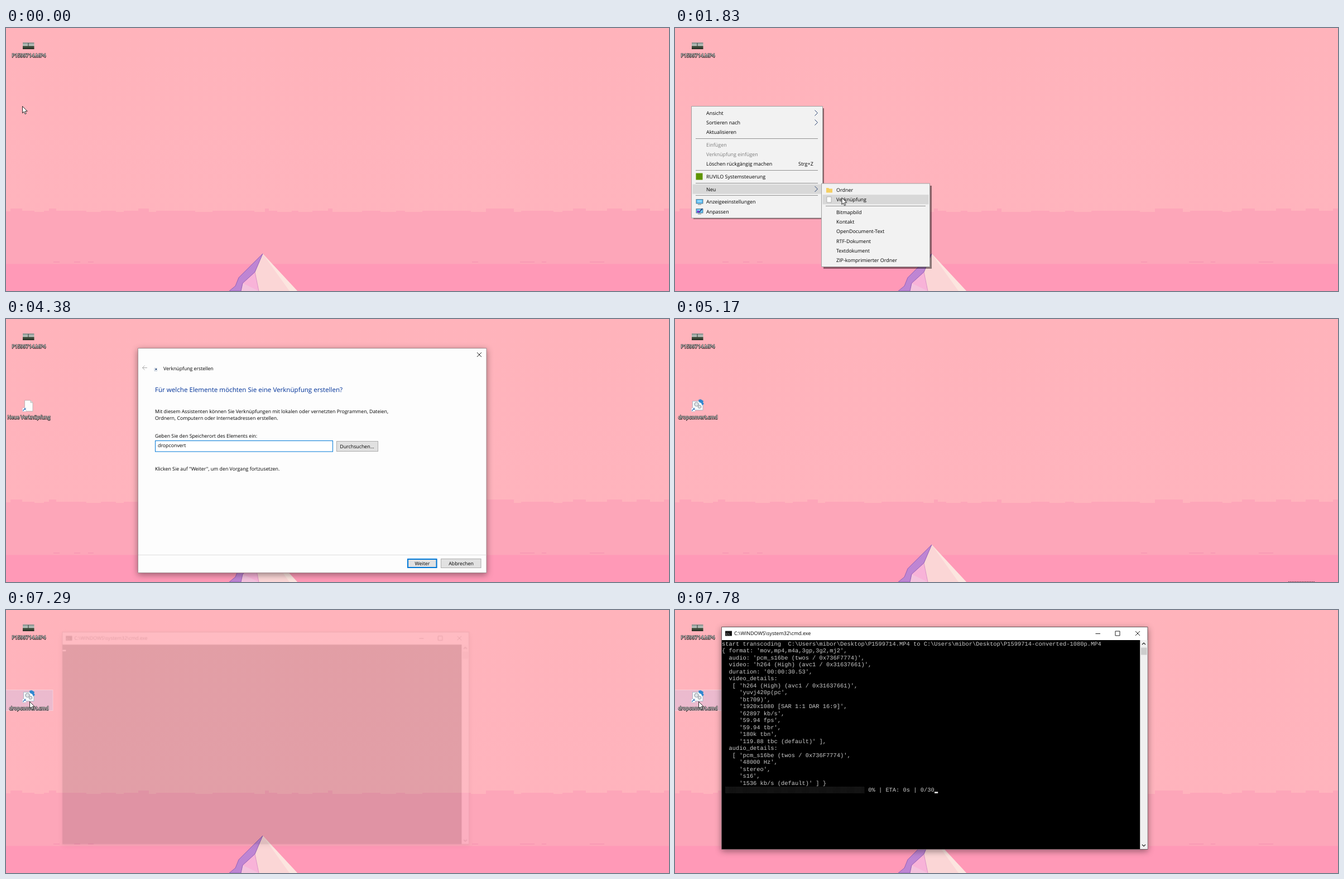
An HTML page that plays this animation: 1188 px wide and 472 px high, repeating every 8000 ms.

```html
<!DOCTYPE html>
<html lang="de">
<head>
<meta charset="utf-8">
<title>Verknüpfung erstellen</title>
<style>
html, body { margin: 0; height: 100%; overflow: hidden; background: #ffb3bb; }
svg { display: block; width: 100vw; height: 100vh; }
text { font: 8.8px "Open Sans", "Noto Sans", sans-serif; text-rendering: geometricPrecision; white-space: pre; }
.menu text { font-size: 8.95px; }
.off { fill: #7d7d7d; }
.sep { stroke: #919191; }
.chev { fill: none; stroke: #27406f; }
.label { fill: #fff; text-anchor: middle; paint-order: stroke; stroke: #222; stroke-opacity: .75; stroke-width: 1.3px; filter: drop-shadow(.5px 1px .6px #0009); }
.tint { fill: #b4cdff; fill-opacity: .27; stroke: #fff; stroke-opacity: .3; }
.head { font-size: 11.6px; fill: #039; }
.btn { fill: #e1e1e1; stroke: #adadad; }
.focus { fill: #e1e1e1; stroke: #0078d7; stroke-width: 2; }
.field { fill: #fff; stroke: #0078d7; }
.mid { text-anchor: middle; }
.glyph { fill: none; stroke: #222; }
.console text { font: 10.405px "Liberation Mono", "DejaVu Sans Mono", monospace; fill: #ccc; }

/* 1% = 80 ms */
.a { animation: 8s step-end infinite; }
.move { animation-timing-function: linear; }
.cursor { animation-name: cursor; }
.menu1 { animation-name: menu1; }
.menu2 { animation-name: menu2; }
.hover1 { animation-name: hover1; }
.hover2 { animation-name: hover2; }
.newicon { animation-name: newicon; }
.cmdicon { animation-name: cmdicon; }
.dialog { animation-name: dialog; transform-origin: 548.5px 254px; }
.page1 { animation-name: page1; }
.page2 { animation-name: page2; }
.ready { animation-name: ready; }
.typing { animation-name: typing; }
.caret { animation-name: caret; }
.filehover { animation-name: filehover; }
.cmdhover { animation-name: cmdhover; }
.ghost { animation-name: ghost; }
.edge { animation-name: edge; }
.shell { animation-name: shell; transform-origin: 465px 229.5px; }
.first { animation-name: first; }
.rest { animation-name: rest; }
.block { animation-name: block; }

@keyframes cursor {
  0%, 5% { transform: translate(29px, 140px); opacity: 1; }
  10%, 10.6% { transform: translate(124px, 285px); }
  11.875%, 12.8% { transform: translate(121px, 284px); }
  14.75%, 17.5% { transform: translate(234px, 284px); }
  19% { transform: translate(268px, 288px); }
  20.6% { transform: translate(290px, 299.5px); }
  23.875%, 26.12% { transform: translate(302px, 306px); opacity: 1; }
  26.125% { transform: translate(302px, 306px); opacity: 0; }
  71.99% { transform: translate(198px, 3px); opacity: 0; }
  72% { transform: translate(198px, 3px); opacity: 1; }
  75% { transform: translate(88px, 24px); }
  77.75%, 80% { transform: translate(40px, 34px); }
  87%, 100% { transform: translate(42px, 164px); opacity: 1; }
}
@keyframes menu1 {
  0%, 2.3% { opacity: 0; }
  3.9%, 26.12% { opacity: 1; }
  26.125%, 100% { opacity: 0; }
}
@keyframes menu2 {
  0%, 12.8% { opacity: 0; }
  14.75%, 26.12% { opacity: 1; }
  26.125%, 100% { opacity: 0; }
}
@keyframes hover1 {
  0% { opacity: 0; transform: none; }
  5.15% { opacity: 1; transform: none; }
  5.75% { opacity: 1; transform: translateY(17.2px); }
  6.3% { opacity: 1; transform: translateY(34.4px); }
  7.1% { opacity: 1; transform: translateY(57.2px); }
  7.7% { opacity: 1; transform: translateY(74.4px); }
  8.3% { opacity: 1; transform: translateY(91.6px); }
  9.05% { opacity: 1; transform: translateY(114.4px); }
  9.8%, 100% { opacity: 1; transform: translateY(137.2px); }
}
@keyframes hover2 {
  0% { opacity: 0; transform: none; }
  18.75% { opacity: 1; transform: none; }
  20.6%, 100% { opacity: 1; transform: translateY(17.2px); }
}
@keyframes newicon { 0% { opacity: 0; } 26.125% { opacity: 1; } 63.75%, 100% { opacity: 0; } }
@keyframes cmdicon { 0% { opacity: 0; } 63.75%, 100% { opacity: 1; } }
@keyframes dialog {
  0%, 26.8% { opacity: 0; transform: scale(.95); }
  28% { opacity: .6; transform: scale(.985); }
  29.5%, 61% { opacity: 1; transform: none; }
  63.125%, 100% { opacity: 0; transform: scale(.93); }
}
@keyframes page1 { 0% { opacity: 1; } 58.25%, 100% { opacity: 0; } }
@keyframes page2 { 0% { opacity: 0; } 58.25%, 100% { opacity: 1; } }
@keyframes ready { 0% { opacity: 0; } 33.75%, 100% { opacity: 1; } }
@keyframes typing {
  0% { transform: none; }
  33.75% { transform: translateX(5.4px); }
  34.375% { transform: translateX(9px); }
  35% { transform: translateX(14.3px); }
  37.25% { transform: translateX(19.7px); }
  41.375% { transform: translateX(29.2px); }
  43.625% { transform: translateX(34.6px); }
  46.75% { transform: translateX(39px); }
  47.5% { transform: translateX(44px); }
  48.375%, 100% { transform: translateX(50.8px); }
}
@keyframes caret { 0% { opacity: 1; } 31.5% { opacity: 0; } 33.75% { opacity: 1; } 54.75%, 100% { opacity: 0; } }
@keyframes filehover { 0% { opacity: 0; } 75.2% { opacity: 1; } 89.25%, 100% { opacity: 0; } }
@keyframes cmdhover { 0% { opacity: 0; } 85.9%, 100% { opacity: 1; } }
@keyframes ghost {
  0%, 79.99% { opacity: 0; transform: none; }
  80% { opacity: .55; transform: none; }
  87%, 89.24% { opacity: .55; transform: translate(2px, 130px); }
  89.25%, 100% { opacity: 0; transform: translate(2px, 130px); }
}
@keyframes edge { 0% { opacity: 0; } 64.625% { opacity: 1; } 89.25%, 100% { opacity: 0; } }
@keyframes shell {
  0%, 90.8% { opacity: 0; transform: scale(.95); }
  91.125% { opacity: .11; transform: scale(.954); }
  92.2% { opacity: .65; transform: scale(.985); }
  93.6%, 100% { opacity: 1; transform: none; }
}
@keyframes first { 0% { opacity: 0; } 94.375%, 100% { opacity: 1; } }
@keyframes rest { 0% { opacity: 0; } 97.25%, 100% { opacity: 1; } }
@keyframes block {
  0% { transform: none; }
  94.375% { transform: translateY(12.5px); }
  97.25%, 100% { transform: translate(381px, 262.3px); }
}
</style>
</head>
<body>
<svg viewBox="0 0 1188 472" preserveAspectRatio="none">
  <defs>
    <linearGradient id="sky" x2="0" y2="1">
      <stop stop-color="#ffb3bb"/><stop offset="1" stop-color="#ffb4be"/>
    </linearGradient>
    <linearGradient id="photo" x2="0" y2="1">
      <stop stop-color="#7f8a86"/><stop offset=".45" stop-color="#c3cac6"/>
      <stop offset=".55" stop-color="#4c5a48"/><stop offset="1" stop-color="#23291f"/>
    </linearGradient>
    <g id="file">
      <rect x="30" y="26" width="20.500" height="12" fill="url(#photo)"/>
      <path d="M40 27v6" stroke="#333"/>
      <text class="label" x="41" y="52">P1599714.MP4</text>
    </g>
    <g id="link">
      <path d="M29.500 159.500h6.500v6.500h-6.500z" fill="#fff" stroke="#a9b8c8" stroke-width=".5"/>
      <path d="M31 165c0-2 1-3 3-3m-1.500-1.200h2v2.200" fill="none" stroke="#1c62b5" stroke-width="1.100"/>
    </g>
    <g id="screen">
      <rect x="38" y="307.500" width="12" height="7.500" fill="#4fb6f0" stroke="#5b6d7c" stroke-width=".8"/>
      <path d="M40 309h8v4h-8z" fill="#8ed5fa"/>
      <path d="M41 316.800h6" stroke="#6c7984"/>
    </g>
    <path id="chev" class="chev" d="M0 0l5 5-5 5"/>
    <path id="x" class="glyph" d="M0 0l8 8M8 0l-8 8"/>
  </defs>

  <!-- wallpaper -->
  <rect width="1188" height="472" fill="url(#sky)"/>
  <path id="haze" fill="#fda6b9"/>
  <path d="M0 423.500H1188V472H0z" fill="#ff99b7"/>
  <path d="M85 420h11m26 0h11m14 0h10m678 0h11m75 0h26m13 0h8m78 0h26" stroke="#f797b2" stroke-width="1.500"/>
  <path d="M460 405l-14 33 7 34h69z" fill="#fbd6d6"/>
  <path d="M460 405l62 67h-14z" fill="#fce5df"/>
  <path d="M424 458l22-20 7 34h-32z" fill="#f8b3d8"/>
  <path d="M424 458l29 14h-32z" fill="#f4c2dd"/>
  <path d="M460 405l-43 43-6 15-11 9h21l3-14 22-20z" fill="#be85d3" stroke="#8e5db6" stroke-width=".9"/>
  <path d="M446 438l7 34" stroke="#d58fc6" stroke-width=".8"/>
  <path class="a edge" d="M1099 471.500h48" stroke="#704852" stroke-dasharray="2 1"/>

  <!-- desktop icons -->
  <rect class="a filehover tint" x="-1" y="17.500" width="85" height="37"/>
  <use href="#file"/>
  <g class="a newicon">
    <path d="M33.500 146h10.500l4 4v15.500h-14.500z" fill="#fcfcfc" stroke="#a8a8a8" stroke-width=".7"/>
    <path d="M44 146v4h4" fill="#e2e2e2" stroke="#a8a8a8" stroke-width=".7"/>
    <use href="#link"/>
    <text class="label" x="41" y="179">Neue Verknüpfung</text>
  </g>
  <g class="a cmdicon">
    <rect class="a cmdhover tint" x="-1" y="143.500" width="85" height="37"/>
    <path d="M31.500 147.500h18.500v16h-18.500z" fill="#f8fbfd" stroke="#8fa6b8" stroke-width=".7"/>
    <path d="M42 145l4-1 5 3-1 3 2 2-3 3-2-4-4-2z" fill="#2f86cf"/>
    <g fill="#dfe4e8" stroke="#8d979f" stroke-width="1.500" stroke-dasharray="1.500 .7">
      <circle cx="38.500" cy="153" r="3.500"/><circle cx="44" cy="157.500" r="2.600"/>
    </g>
    <use href="#link"/>
    <text class="label" x="41" y="179">dropconvert.cmd</text>
  </g>

  <!-- context menu -->
  <g class="a move menu menu1">
    <path d="M33 144h234v199h-234z" fill="#000" opacity=".45"/>
    <path d="M29.500 140.500h235v200.500h-235z" fill="#f2f2f2" stroke="#a0a0a0"/>
    <rect class="a hover1" x="31.500" y="143.400" width="231.500" height="17.200" fill="#d8d8d8"/>
    <path class="sep" d="M37 198.500h219M37 255.500h219M37 278.500h219M37 300.500h219"/>
    <text x="56" y="155.500">Ansicht</text>
    <text x="56" y="172.700">Sortieren nach</text>
    <text x="56" y="189.900">Aktualisieren</text>
    <text class="off" x="56" y="212.700">Einfügen</text>
    <text class="off" x="56" y="229.900">Verknüpfung einfügen</text>
    <text x="56" y="247.100">Löschen rückgängig machen</text>
    <text x="221" y="247.100">Strg+Z</text>
    <text x="56" y="269.900">RUVILO Systemsteuerung</text>
    <text x="56" y="292.500">Neu</text>
    <text x="56" y="315.300">Anzeigeeinstellungen</text>
    <text x="56" y="332.500">Anpassen</text>
    <use href="#chev" x="250.500" y="147.500"/>
    <use href="#chev" x="250.500" y="164.500"/>
    <use href="#chev" x="250.500" y="284"/>
    <rect x="37.500" y="260.500" width="12" height="12" fill="#5f9400"/>
    <use href="#screen"/>
    <use href="#screen" y="17"/>
    <path d="M43 331l6-7" stroke="#223f78" stroke-width="1.800"/>
    <circle cx="41.500" cy="329.500" r="2" fill="#7a2fd0"/>
  </g>
  <g class="a move menu menu2">
    <path d="M266 283h194v149h-194z" fill="#000" opacity=".45"/>
    <path d="M262.500 279h194v149.500h-194z" fill="#f2f2f2" stroke="#a0a0a0"/>
    <rect class="a hover2" x="264.500" y="282" width="190" height="17.200" fill="#d8d8d8"/>
    <path class="sep" d="M270 319.500h179"/>
    <path d="M271 287h4l1.500 1.500h5.500v7h-11z" fill="#f5cf63"/>
    <path d="M272 303h8v10h-8z" fill="#fff" stroke="#999" stroke-width=".7"/>
    <text x="289" y="294">Ordner</text>
    <text x="289" y="311.200">Verknüpfung</text>
    <text x="289" y="334">Bitmapbild</text>
    <text x="289" y="351.200">Kontakt</text>
    <text x="289" y="368.400">OpenDocument-Text</text>
    <text x="289" y="385.600">RTF-Dokument</text>
    <text x="289" y="402.800">Textdokument</text>
    <text x="289" y="420">ZIP-komprimierter Ordner</text>
  </g>

  <!-- assistant -->
  <g class="a move dialog">
    <path d="M236.500 52.500h624.500v403h-624.500z" fill="#fdfdfd" stroke="#a58b90" style="filter:drop-shadow(0 3px 6px #0006)"/>
    <path d="M237 423.500h623.500" stroke="#dfdfdf"/>
    <use href="#x" x="844" y="60"/>
    <path d="M266 88h4.500v5.500h-4.500z" fill="#fff" stroke="#a9b8c8" stroke-width=".6"/>
    <path d="M267 92l2.500-2.500m-2 0h2v2" fill="none" stroke="#1c3f75"/>
    <text x="282" y="91.500" style="font-size:8.700px">Verknüpfung erstellen</text>
    <rect class="btn" x="779.500" y="430.500" width="71.500" height="16"/>
    <text class="mid" x="815.500" y="442">Abbrechen</text>
    <g class="a page1">
      <path class="glyph" d="M253 87.500h-8.500m4-4l-4 4 4 4" style="stroke:#aaa"/>
      <text class="head" x="267" y="131">Für welche Elemente möchten Sie eine Verknüpfung erstellen?</text>
      <text x="267" y="169">Mit diesem Assistenten können Sie Verknüpfungen mit lokalen oder vernetzten Programmen, Dateien,</text>
      <text x="267" y="180.500">Ordnern, Computern oder Internetadressen erstellen.</text>
      <text x="267" y="212.500">Geben Sie den Speicherort des Elements ein:</text>
      <rect class="field" x="267.500" y="218.500" width="318" height="19.500"/>
      <text x="272" y="230">dropconvert</text>
      <g class="a typing">
        <path d="M272 220h60v16h-60z" fill="#fff"/>
        <path class="a caret" d="M272.500 220.500v11.500" stroke="#000"/>
      </g>
      <rect class="btn" x="592.500" y="219.500" width="74" height="18"/>
      <text class="mid" x="629" y="231.500">Durchsuchen...</text>
      <text x="267" y="271.500">Klicken Sie auf "Weiter", um den Vorgang fortzusetzen.</text>
      <path d="M719.500 430.500h52.500v16h-52.500z" fill="#ccc" stroke="#bfbfbf"/>
      <text class="mid off" x="746" y="442">Weiter</text>
      <g class="a ready">
        <rect class="focus" x="720" y="431" width="51.500" height="15"/>
        <text class="mid" x="746" y="442">Weiter</text>
      </g>
    </g>
    <g class="a page2">
      <path class="glyph" d="M253 87.500h-8.500m4-4l-4 4 4 4"/>
      <text class="head" x="267" y="131">Wie soll die Verknüpfung benannt werden?</text>
      <text x="267" y="169">Geben Sie den Namen für die Verknüpfung ein:</text>
      <rect class="field" x="267.500" y="175.500" width="318" height="19.500"/>
      <path d="M271.500 177.500h72v12h-72z" fill="#0078d7"/>
      <text x="272" y="187" fill="#fff">dropconvert.cmd</text>
      <text x="267" y="228">Klicken Sie auf "Fertig stellen", um die Verknüpfung zu erstellen.</text>
      <rect class="focus" x="697" y="431" width="74.500" height="15"/>
      <text class="mid" x="734.500" y="442">Fertig stellen</text>
    </g>
  </g>

  <!-- command prompt -->
  <g class="a move shell">
    <path d="M83.500 30.500h763.500v399h-763.500z" fill="#fff" stroke="#6b5a5e" style="filter:drop-shadow(0 3px 6px #0006)"/>
    <path d="M84 54h749.500v375h-749.500z"/>
    <path d="M833.500 54h13v375h-13z" fill="#f0f0f0"/>
    <path d="M835 67.500h10.500v13h-10.500z" fill="#cdcdcd"/>
    <path class="glyph" d="M837 62l3-3 3 3M837 421l3 3 3-3" stroke-width="1.200"/>
    <path d="M90 37h12v9.500h-12z" fill="#111"/>
    <path d="M90 37.500h12" stroke="#aaa"/>
    <text x="91.200" y="44.500" fill="#fff" style="font-size:5px">C:\</text>
    <text x="106" y="45.300" style="font-size:9px">C:\WINDOWS\system32\cmd.exe</text>
    <path class="glyph" d="M753.500 42.500h8.500M789 38h8v8h-8z"/>
    <use href="#x" x="825" y="38"/>
    <g class="console">
      <g class="a first" id="first"></g>
      <g class="a rest" id="rest"></g>
    </g>
    <path class="a block" d="M84 64h6.200v2.500h-6.200z" fill="#fff"/>
  </g>

  <use class="a move ghost" href="#file"/>
  <path class="a move cursor" d="M.5.5v12.200l2.800-2.700 1.900 4.500 2-.9-1.900-4.300h3.900z" fill="#fff" stroke="#111" stroke-width=".9"/>
</svg>
<script>
const $ = id => document.getElementById(id);

// Ragged upper rim of the haze
let seed = 4711;
const rnd = () => (seed = seed * 16807 % 2147483647) / 2147483647;
let rim = "M0 472V329";
for (let x = 8; x < 1188; x += 5 + rnd() * 24) {
  rim += `H${Math.round(x)}V${[324, 328, 328, 330][rnd() * 4 | 0]}`;
}
$("haze").setAttribute("d", rim + "H1188V472z");

const home = "C:\\Users\\mibor\\Desktop\\P1599714";
const output = `start transcoding  ${home}.MP4 to ${home}-converted-1080p.MP4
{ format: 'mov,mp4,m4a,3gp,3g2,mj2',
  audio: 'pcm_s16be (twos / 0x736F7774)',
  video: 'h264 (High) (avc1 / 0x31637661)',
  duration: '00:00:30.53',
  video_details:
   [ 'h264 (High) (avc1 / 0x31637661)',
     'yuvj420p(pc',
     'bt709)',
     '1920x1080 [SAR 1:1 DAR 16:9]',
     '62897 kb/s',
     '59.94 fps',
     '59.94 tbr',
     '180k tbn',
     '119.88 tbc (default)' ],
  audio_details:
   [ 'pcm_s16be (twos / 0x736F7774)',
     '48000 Hz',
     'stereo',
     's16',
     '1536 kb/s (default)' ] }`.split("\n");

function print(parent, line, col, str, fill) {
  const el = document.createElementNS("http://www.w3.org/2000/svg", "text");
  el.setAttribute("x", 84 + col * 6.243);
  el.setAttribute("y", 64 + line * 12.49);
  if (fill) el.style.fill = fill;
  el.textContent = str;
  $(parent).append(el);
}
output.forEach((str, i) => print(i ? "rest" : "first", i, 0, str));
print("rest", output.length, 1, "░".repeat(40), "#999");
print("rest", output.length, 42, "0% | ETA: 0s | 0/30");
</script>
</body>
</html>
```
